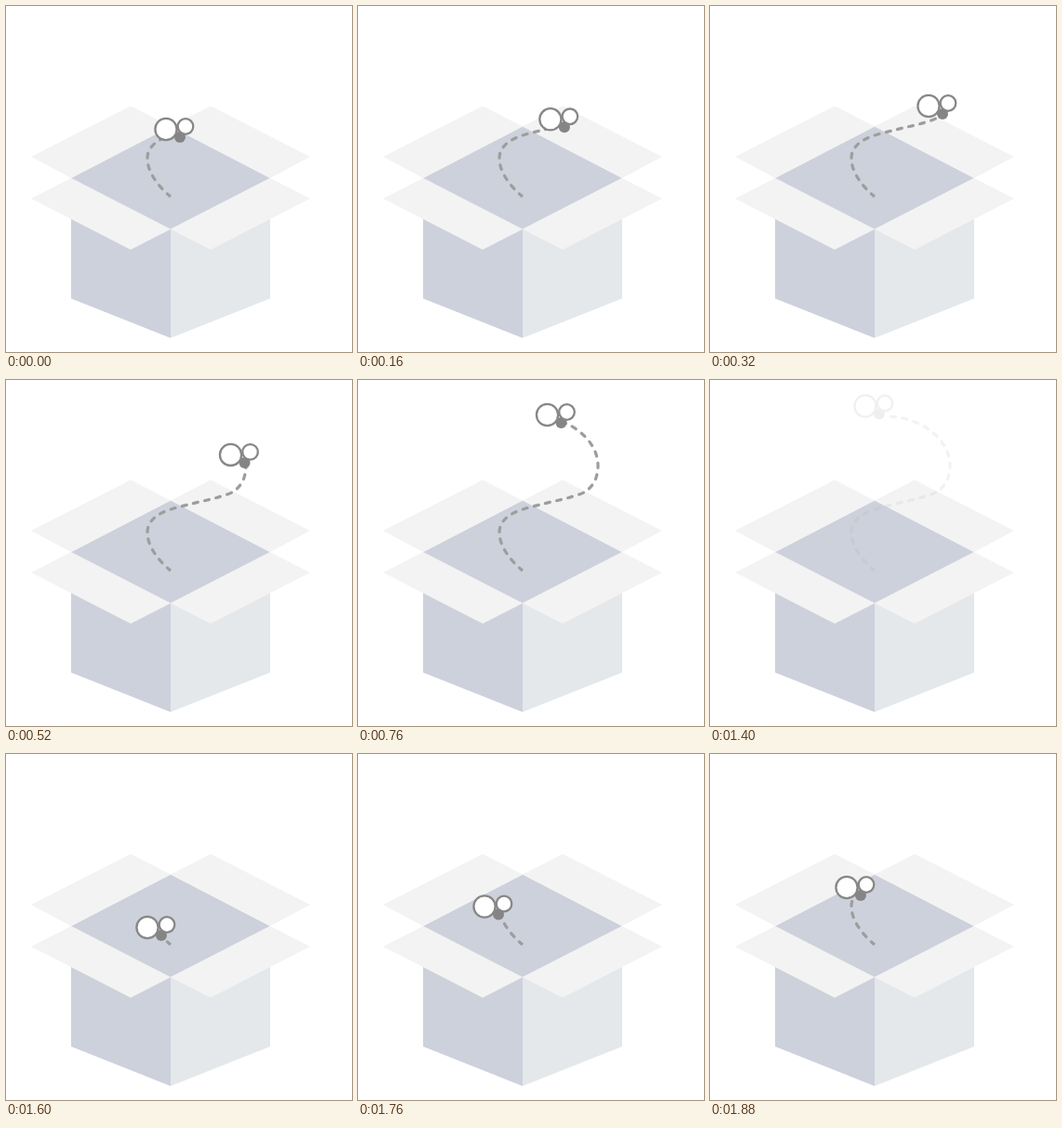
These frames come from a looping animation (372 px wide and 372 px high, 1920 ms). An HTML page:

```html
<!DOCTYPE html>
<html lang="en">
<head>
<meta charset="utf-8">
<title>Empty box</title>
<style>
  html, body { margin: 0; width: 100%; height: 100%; overflow: hidden; background: #fff; }
  svg { display: block; width: 100%; height: 100%; }
</style>
</head>
<body>
<svg viewBox="0 0 372 372">
  <path fill="#cdd1db" d="M70 185 177 129.5 284 185 177 240Z"/>
  <path fill="#cdd1db" d="M70 185 177 240V357L70 314.5Z"/>
  <path fill="#e4e8eb" d="M284 185 177 240V357L284 314.5Z"/>
  <g fill="#f3f3f3">
    <path d="M27 162 134 107.5 177 129.5 70 185Z"/>
    <path d="M327 162 220 107.5 177 129.5 284 185Z"/>
    <path d="M27 207 70 185 177 240 134 262Z"/>
    <path d="M327 207 284 185 177 240 220 262Z"/>
  </g>
  <g id="scene">
    <mask id="reveal" maskUnits="userSpaceOnUse" x="0" y="0" width="372" height="372">
      <path id="cover" fill="none" stroke="#fff" stroke-width="8"/>
    </mask>
    <g mask="url(#reveal)">
      <path id="trail" fill="none" stroke="#9d9d9d" stroke-width="3.2" stroke-linecap="round"
        stroke-dasharray="5 7.5"
        d="M177 205C166 196 152 180 152 164C152 147 171 140 188 136C206 131 220 129 238 123C252 118 258 106 258 92C258 65 228 39 188 39"/>
    </g>
    <g id="fly" fill="#fff" stroke="#878787" stroke-width="2.3">
      <circle r="6" fill="#858585" stroke="none"/>
      <circle cx="-15" cy="-8.5" r="11.6"/>
      <circle cx="6" cy="-11.5" r="8.3"/>
    </g>
  </g>
</svg>
<script>
const LOOP = 1920;
const [scene, cover, trail, fly] = ['scene', 'cover', 'trail', 'fly'].map(id => document.getElementById(id));

// Flight waypoints: time, x, y. Negative times lie before the loop seam.
const route = [
  [-500, 177, 206], [-420, 167, 195], [-260, 151, 172.5], [-140, 162, 152],
  [0, 187, 141], [320, 250, 116], [600, 251, 67], [760, 218.5, 46], [1000, 182, 36.5]
];

const trailLength = trail.getTotalLength();
const samples = Array.from({ length: Math.floor(trailLength) + 1 }, (_, s) => trail.getPointAtLength(s));
cover.setAttribute('d', trail.getAttribute('d'));

const clamp = (v, lo, hi) => Math.min(hi, Math.max(lo, v));

function slope(i, axis) {
  const a = route[Math.max(0, i - 1)], b = route[Math.min(route.length - 1, i + 1)];
  return (b[axis] - a[axis]) / (b[0] - a[0]);
}

function position(time) {
  const t = clamp(time, route[0][0], route[route.length - 1][0]);
  let i = 0;
  while (i < route.length - 2 && t > route[i + 1][0]) i++;
  const a = route[i], b = route[i + 1], span = b[0] - a[0], k = (t - a[0]) / span;
  const k2 = k * k, k3 = k2 * k;
  return [1, 2].map(axis =>
    a[axis] * (2 * k3 - 3 * k2 + 1) + b[axis] * (3 * k2 - 2 * k3) +
    span * (slope(i, axis) * (k3 - 2 * k2 + k) + slope(i + 1, axis) * (k3 - k2)));
}

function nearestLength(x, y) {
  let best = 0, least = Infinity;
  samples.forEach((p, s) => {
    const d = Math.hypot(p.x - x, p.y - y);
    if (d < least) { least = d; best = s; }
  });
  return best;
}

// The motion runs in 80 ms steps with a few longer holds.
function stepped(t) {
  if (t >= 1880) return 1880;
  if (t >= 1400 && t < 1600) return 1400;
  if (t >= 480 && t < 600) return 480;
  const start = t >= 600 && t < 1400 ? 600 : 0;
  return start + Math.floor((t - start) / 80) * 80;
}

function draw(now) {
  const t = stepped(now % LOOP);
  const rising = t >= 1600;
  const [x, y] = position(rising ? t - LOOP - 100 : t);
  const shown = t >= 1000 && !rising ? trailLength : Math.max(0, nearestLength(x, y) - 5);
  fly.setAttribute('transform', `translate(${x} ${y})`);
  cover.setAttribute('stroke-dasharray', `${shown} ${trailLength + 20}`);
  scene.setAttribute('opacity', rising ? 1 : clamp(1 - (t - 980) / 420 * 0.88, 0, 1));
}

const begin = performance.now();
function tick() {
  draw(performance.now() - begin);
  requestAnimationFrame(tick);
}
tick();
</script>
</body>
</html>
```
